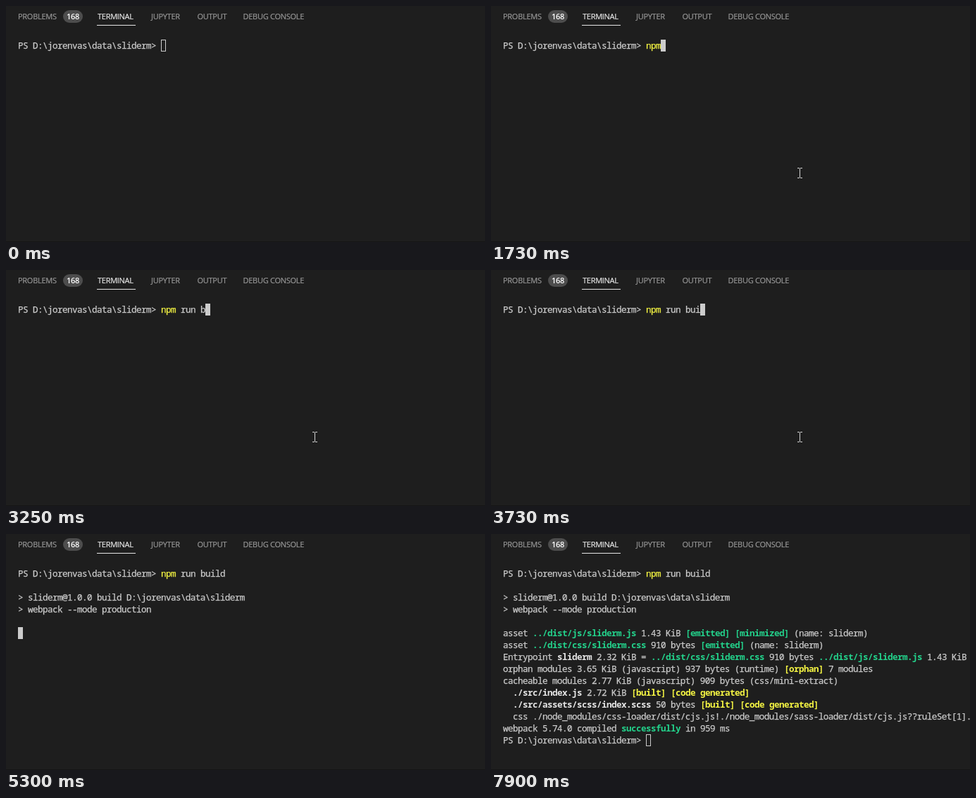
Animation of 680 by 337 pixels, one loop 8.04 s. Source, as an HTML page:

```html
<!DOCTYPE html>
<html lang="en">
<head>
<meta charset="utf-8">
<title>Terminal build</title>
<style>
  html, body { margin: 0; width: 100%; height: 100%; overflow: hidden; background: #1e1e1e; }
  svg { display: block; width: 100vw; height: 100vh; }
  text { white-space: pre; }
  .tab { font: 11px "Open Sans", "Noto Sans", sans-serif; letter-spacing: -.28px; fill: #979797; stroke: #979797; stroke-width: .2; }
  .active { fill: #e7e7e7; stroke: #e7e7e7; }
  .badge { font-weight: 600; fill: #fff; stroke: none; }
  /* 7.56px glyphs set tight into 7px cells */
  .term { font: 12.6px "Noto Sans Mono", "DejaVu Sans Mono", monospace; letter-spacing: -.56px; fill: #ccc; stroke: #ccc; stroke-width: .25; }
  .g, .y, .w { font-weight: 700; stroke: none; }
  .g { fill: #23d18b; }
  .y, .c { fill: #f5f543; }
  .c { stroke: #f5f543; }
  .w { fill: #e5e5e5; }
</style>
</head>
<body>
<svg id="stage" viewBox="0 0 680 337">
  <rect width="680" height="337" fill="#1e1e1e"/>
  <rect y="336" width="680" height="1" fill="#161616"/>
  <rect x="81" y="6" width="28" height="18" rx="9" fill="#4d4d4d"/>
  <rect x="129" y="27" width="55" height="1" fill="#e7e7e7"/>
</svg>
<script>
const LOOP = 8040, LEFT = 17, TOP = 48, CELL = 7, ROW = 17;
const stage = document.getElementById('stage');

function add(tag, attrs, parent = stage) {
  const el = document.createElementNS('http://www.w3.org/2000/svg', tag);
  for (const k in attrs) el.setAttribute(k, attrs[k]);
  return parent.appendChild(el);
}

function label(x, y, str, cls, parent) {
  add('text', { x, y, class: cls }, parent).textContent = str;
}

// Holds each state until the next entry of the table: [ms, properties].
function play(el, table) {
  const keys = table.map(([t, props]) => ({ ...props, offset: t / LOOP, easing: 'steps(1, end)' }));
  keys.push({ ...table[table.length - 1][1], offset: 1 });
  el.animate(keys, { duration: LOOP, iterations: Infinity });
}

function show(el, from, to = LOOP) {
  const table = [[0, { opacity: from ? 0 : 1 }]];
  if (from) table.push([from, { opacity: 1 }]);
  if (to < LOOP) table.push([to, { opacity: 0 }]);
  play(el, table);
}

// "^g", "^y", "^w", "^c" switch the style, "^d" returns to plain.
function line(row, str, parent, col = 0) {
  const parts = str.split(/\^([gywcd])/);
  for (let i = 0, cls = 'd'; i < parts.length; i += 2) {
    if (i) cls = parts[i - 1];
    if (parts[i]) label(LEFT + col * CELL, TOP + row * ROW + 13, parts[i], 'term ' + cls, parent);
    col += parts[i].length;
  }
}

// Tab bar
[[17, 'PROBLEMS'], [130, 'TERMINAL', 'active'], [206, 'JUPYTER'], [271.5, 'OUTPUT'], [336.5, 'DEBUG CONSOLE'],
  [86, '168', 'badge']].forEach(([x, str, cls = '']) => label(x, 19, str, 'tab ' + cls));

// Prompt and typed command
const path = String.raw`D:\jorenvas\data\sliderm`;
const prompt = `PS ${path}> `;
const start = prompt.length;
const command = 'npm run build';
const strokes = [1180, 1320, 1660, 2140, 2280, 2490, 2690, 2820, 3250, 3450, 3660, 3800, 3930];

line(0, prompt, stage);
strokes.forEach((t, i) => {
  const key = add('g', {});
  line(0, (i < 3 ? '^c' : '') + command[i], key, start + i);
  show(key, t);
});

// Output blocks: time, first row, lines
const blocks = [
  [4820, 2, [`> sliderm@1.0.0 build ${path}`, '> webpack --mode production']],
  [6800, 5, [
    'asset ^g../dist/js/sliderm.js^d 1.43 KiB ^g[emitted]^d ^g[minimized]^d (name: sliderm)',
    'asset ^g../dist/css/sliderm.css^d 910 bytes ^g[emitted]^d (name: sliderm)',
    'Entrypoint ^wsliderm^d 2.32 KiB = ^g../dist/css/sliderm.css^d 910 bytes ^g../dist/js/sliderm.js^d 1.43 KiB',
    'orphan modules 3.65 KiB (javascript) 937 bytes (runtime) ^y[orphan]^d 7 modules',
    'cacheable modules 2.77 KiB (javascript) 909 bytes (css/mini-extract)',
    '  ^w./src/index.js^d 2.72 KiB ^y[built]^d ^y[code generated]',
    '  ^w./src/assets/scss/index.scss^d 50 bytes ^y[built]^d ^y[code generated]',
    '  css ./node_modules/css-loader/dist/cjs.js!./node_modules/sass-loader/dist/cjs.js??ruleSet[1].',
    'webpack 5.74.0 compiled ^gsuccessfully^d in 959 ms'
  ]],
  [6870, 14, [prompt]]
];
for (const [t, row, lines] of blocks) {
  const group = add('g', {});
  lines.forEach((str, i) => line(row + i, str, group));
  show(group, t);
}

// Text cursor: outlined without focus, solid with it
const move = (x, y) => ({ transform: `translate(${x}px, ${y}px)` });
const cell = (col, row) => move(LEFT + col * CELL, TOP + row * ROW);
const caret = add('g', {});
const outline = add('rect', { x: .5, y: .5, width: 6, height: 16, fill: 'none', stroke: '#ccc' }, caret);
const solid = add('rect', { width: 7, height: 17, fill: '#ccc' }, caret);
play(caret, [
  [0, cell(start, 0)],
  ...strokes.map((t, i) => [t, cell(start + i + 1, 0)]),
  [4200, cell(0, 1)], [4820, cell(0, 5)], [6800, cell(0, 14)], [6870, cell(start, 14)]
]);
show(solid, 350, 7900);
play(outline, [[0, { opacity: 1 }], [350, { opacity: 0 }], [7900, { opacity: 1 }]]);

// Mouse I-beam
const mouse = add('g', {});
add('path', {
  d: 'M-3 -6.5h3M1 -6.5h3M.5 -6v13M-3 7.5h3M1 7.5h3',
  fill: 'none', stroke: '#d4d4d4'
}, mouse);
const glide = [0, .4, .7, .9, 1].map((p, i) =>
  [70 + i * 70, move(Math.round(510 - 72 * p), Math.round(287 - 49 * p))]);
play(mouse, [[0, move(510, 287)], ...glide, [5170, move(440, 256)], [5240, move(443, 288)]]);
show(mouse, 70, 5300);
</script>
</body>
</html>
```
